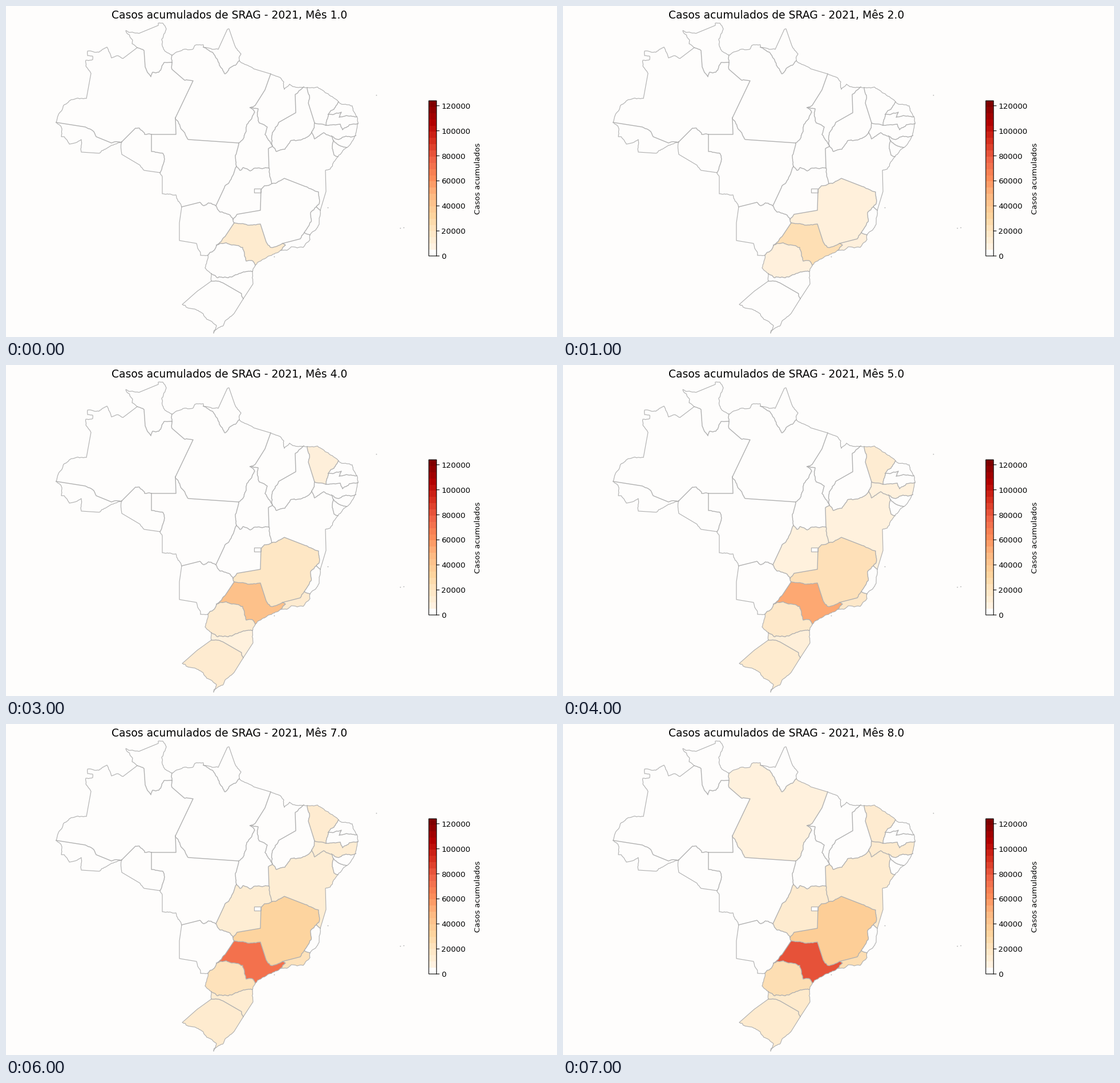
A matplotlib script for the animation above (8000 ms loop, 966 by 580 pixels).

```python
import numpy as np
import matplotlib.pyplot as plt
from matplotlib.animation import FuncAnimation
from matplotlib.patches import Polygon, Rectangle

W, H, DPI = 966, 580, 64
PX = 72 / DPI                 # points per pixel
TOP = 124                     # upper end of the scale, in thousands
PAPER, EDGE = "#fefdfc", "#b0b0b0"
OrRd = plt.get_cmap("OrRd")
rng = np.random.default_rng(7)

plt.rcParams["font.family"] = "DejaVu Sans"
fig = plt.figure(figsize=(W / DPI, H / DPI), dpi=DPI, facecolor=PAPER)
ax = fig.add_axes([0, 0, 1, 1])
ax.set(xlim=(0, W), ylim=(H, 0))
ax.axis("off")

arcs = []                     # (states on either side, points)


def fractal(a, b):
    """Midpoint displacement from a up to b; long surveyed lines stay straight."""
    d = np.subtract(b, a)
    size = np.hypot(*d)
    if not 3 < size < 28:
        return [a]
    mid = np.add(a, b) / 2 + np.array([-d[1], d[0]]) * rng.normal(0, 0.07)
    mid = tuple(mid)
    return fractal(a, mid) + fractal(mid, b)


def arc(sides, *keys):
    """One stretch of coast (one state) or border (two states)."""
    points = [p for a, b in zip(keys, keys[1:]) for p in fractal(a, b)]
    arcs.append((sides.split(), points + [keys[-1]]))


# North
arc("AM", (88, 204), (92, 190), (101, 174), (117, 164), (141, 162),
    (149, 118), (140, 105), (140, 95), (152, 94), (152, 88), (143, 87),
    (143, 79), (163, 81), (177, 72), (185, 91), (196, 87), (205, 92),
    (230, 73))
arc("RR", (230, 73), (221, 66), (222, 60), (210, 43), (233, 48), (267, 34),
    (267, 30), (275, 30), (281, 40), (273, 58), (276, 75), (291, 86))
arc("AM RR", (230, 73), (242, 78), (244, 107), (254, 124), (257, 116),
    (268, 116), (277, 99), (291, 99))
arc("PA RR", (291, 99), (291, 86))
arc("PA AM", (291, 99), (291, 111), (313, 130), (328, 131), (297, 196))
arc("AM MT", (297, 196), (298, 225), (255, 225))
arc("AM RO", (255, 225), (243, 225), (234, 214), (227, 214), (203, 238))
arc("AM AC", (88, 204), (139, 212), (158, 229), (185, 240), (203, 238))
arc("AC", (88, 204), (98, 215), (97, 229), (111, 242), (132, 234),
    (132, 256), (163, 258), (185, 244), (203, 238))
arc("RO", (203, 238), (203, 260), (235, 279), (242, 288), (270, 292))
arc("RO MT", (255, 225), (255, 255), (275, 258), (278, 268), (270, 292))
arc("PA", (291, 86), (305, 79), (327, 76), (331, 69), (346, 68), (346, 72))
arc("AP", (346, 72), (372, 76), (388, 41), (391, 40), (401, 69), (412, 84),
    (409, 96))
arc("PA AP", (346, 72), (362, 81), (372, 98), (384, 119), (393, 108),
    (409, 96))
arc("PA", (409, 96), (418, 102), (434, 110), (464, 119))
arc("PA MA", (464, 119), (454, 147), (437, 174), (428, 178))
arc("PA TO", (428, 178), (436, 186), (422, 208), (421, 218), (408, 240))
arc("PA MT", (408, 240), (320, 234), (306, 213), (297, 196))
arc("TO MA", (428, 178), (442, 180), (444, 205), (458, 212), (454, 225),
    (467, 245))
arc("MT TO", (408, 240), (402, 262), (404, 281))

# Northeast
arc("MA", (464, 119), (480, 125), (487, 133), (488, 146), (497, 137),
    (522, 142))
arc("MA PI", (522, 142), (507, 155), (508, 187), (478, 204), (467, 222),
    (467, 245))
arc("PI", (522, 142), (528, 143))
arc("CE", (528, 143), (546, 142), (565, 154), (583, 168))
arc("CE PI", (528, 143), (530, 170), (541, 205))
arc("CE RN", (583, 168), (575, 181), (565, 190))
arc("CE PB", (565, 190), (561, 209))
arc("CE PE", (561, 209), (541, 205))
arc("RN", (583, 168), (588, 172), (607, 175), (615, 194))
arc("RN PB", (565, 190), (588, 186), (584, 195), (594, 193), (615, 194))
arc("PB", (615, 194), (617, 206))
arc("PE PB", (617, 206), (602, 208), (590, 217), (586, 207), (561, 209))
arc("PE", (617, 206), (613, 227))
arc("PE AL", (613, 227), (596, 228), (583, 234), (571, 228))
arc("PE BA", (571, 228), (557, 222), (541, 233), (536, 221))
arc("PE PI", (536, 221), (541, 205))
arc("BA AL", (571, 228), (574, 236))
arc("AL", (613, 227), (597, 248))
arc("AL SE", (597, 248), (574, 236))
arc("SE", (597, 248), (582, 264))
arc("BA SE", (574, 236), (572, 246), (575, 261), (582, 264))
arc("BA PI", (467, 245), (474, 255), (489, 251), (499, 236), (524, 232),
    (536, 221))
arc("BA TO", (467, 245), (460, 250), (461, 284))
arc("BA", (582, 264), (568, 286), (560, 288), (561, 325), (551, 358))
arc("BA ES", (551, 358), (544, 352))

# Centre
arc("BA GO", (466, 311), (461, 284))
arc("GO TO", (404, 281), (410, 288), (416, 283), (428, 289), (437, 284),
    (461, 284))
arc("GO MT", (404, 281), (395, 303), (383, 318), (368, 350))
arc("GO MS", (368, 350), (375, 361), (398, 374))
arc("GO MG", (398, 374), (405, 365), (446, 358), (447, 322), (453, 315),
    (466, 311))
arc("MT", (270, 292), (274, 300), (274, 329), (298, 331), (308, 352))
arc("MT MS", (308, 352), (340, 344), (347, 350), (355, 345), (368, 350))
arc("MS", (308, 352), (304, 380), (304, 411), (334, 416), (341, 437),
    (354, 437))

# Southeast
arc("BA MG", (544, 352), (548, 326), (524, 316), (488, 302), (466, 311))
arc("MG ES", (544, 352), (534, 362), (535, 378), (523, 397))
arc("MG RJ", (523, 397), (516, 408), (485, 416))
arc("MG SP", (485, 416), (464, 423), (456, 413), (446, 382), (424, 384),
    (400, 380))
arc("MG MS", (400, 380), (398, 374))
arc("RJ ES", (523, 397), (533, 401))
arc("ES", (551, 358), (549, 380), (533, 401))
arc("RJ", (533, 401), (533, 409), (521, 423), (500, 422), (482, 428))
arc("RJ SP", (482, 428), (490, 419), (485, 416))
arc("SP", (482, 428), (459, 439), (437, 454))
arc("SP PR", (437, 454), (431, 446), (421, 447), (415, 423), (393, 418),
    (369, 419))
arc("SP MS", (369, 419), (384, 404), (400, 380))

# South
arc("PR MS", (369, 419), (354, 437))
arc("PR", (354, 437), (349, 459), (360, 469))
arc("PR", (437, 454), (432, 465))
arc("PR SC", (360, 469), (383, 475), (408, 469), (432, 465))
arc("SC", (360, 469), (360, 482))
arc("SC", (432, 465), (433, 487), (416, 513))
arc("SC RS", (360, 482), (380, 485), (413, 504), (416, 513))
arc("RS", (360, 482), (335, 500), (309, 523), (331, 531), (352, 549),
    (369, 560), (364, 573))
arc("RS", (416, 513), (401, 537), (384, 552), (380, 561), (364, 573))


def outline(state):
    """Join a state's arcs end to end into a ring."""
    rest = [p for sides, p in arcs if state in sides]
    ring = list(rest.pop(0))
    while rest:
        i, p = next((i, p) for i, p in enumerate(rest)
                    if ring[-1] in (p[0], p[-1]))
        rest.pop(i)
        ring += p[1:] if p[0] == ring[-1] else p[-2::-1]
    return ring


# Accumulated cases in thousands: first month, monthly growth, ceiling
growth = {
    "SP": (13, 10, TOP), "MG": (3, 4.6, TOP), "RJ": (4, 2.8, TOP),
    "PR": (4, 2.8, TOP), "RS": (0.5, 4, 13), "SC": (1.2, 1.8, TOP),
    "CE": (-2, 3.3, 12.5), "BA": (-1.3, 2, TOP), "PE": (-1.3, 2, TOP),
    "GO": (-1.3, 2, TOP), "PA": (-7.5, 2, TOP),
}


def shade(state, month):
    first, rate, ceiling = growth[state]
    v = min(first + rate * month, ceiling)
    return PAPER if v < 5 else OrRd(v / TOP)


fills = {s: ax.add_patch(Polygon(outline(s), lw=0)) for s in growth}
for sides, pts in arcs:
    ax.plot(*zip(*pts), color=EDGE, lw=(0.9 + 0.25 * len(sides)) * PX)
ax.add_patch(Rectangle((435, 319.5), 12, 7.5, fc=PAPER, ec=EDGE, lw=1.2 * PX))
for x, y in [(649, 156), (564, 353), (691, 389), (697, 388), (470, 439)]:
    ax.plot(x, y, "o", ms=1.8 * PX, color=EDGE, mew=0)

# Colour scale: 25 steps, the lowest one blank
X0, X1, Y0, Y1 = 741.2, 754.8, 438, 166
step = (Y0 - Y1) / 25
for k in range(25):
    ax.add_patch(Rectangle((X0, Y0 - (k + 1) * step), X1 - X0, step, lw=0,
                           fc=OrRd(k / 24) if k else PAPER,
                           antialiased=False))
ax.add_patch(Rectangle((X0, Y1), X1 - X0, Y0 - Y1, fill=False, ec="black",
                       lw=1.07 * PX, snap=False))
for v in range(0, 121, 20):
    y = Y0 - v / TOP * (Y0 - Y1)
    ax.plot([X1, X1 + 4.7], [y, y], color="black", lw=1.07 * PX, snap=False)
    ax.text(763.5, y + 5, str(v * 1000), size=13.42 * PX)
ax.text(831, 302, "Casos acumulados", size=13.42 * PX, rotation=90,
        rotation_mode="anchor", ha="center", va="baseline")

title = ax.text(391.5, 21.6, "", size=18.78 * PX, ha="center", va="baseline")


def draw(month):
    title.set_text(f"Casos acumulados de SRAG - 2021, Mês {month + 1:.1f}")
    for state, patch in fills.items():
        patch.set_facecolor(shade(state, month))
    return [title, *fills.values()]


anim = FuncAnimation(fig, draw, frames=8, interval=1000, repeat=True,
                     repeat_delay=0)
plt.show()
```
